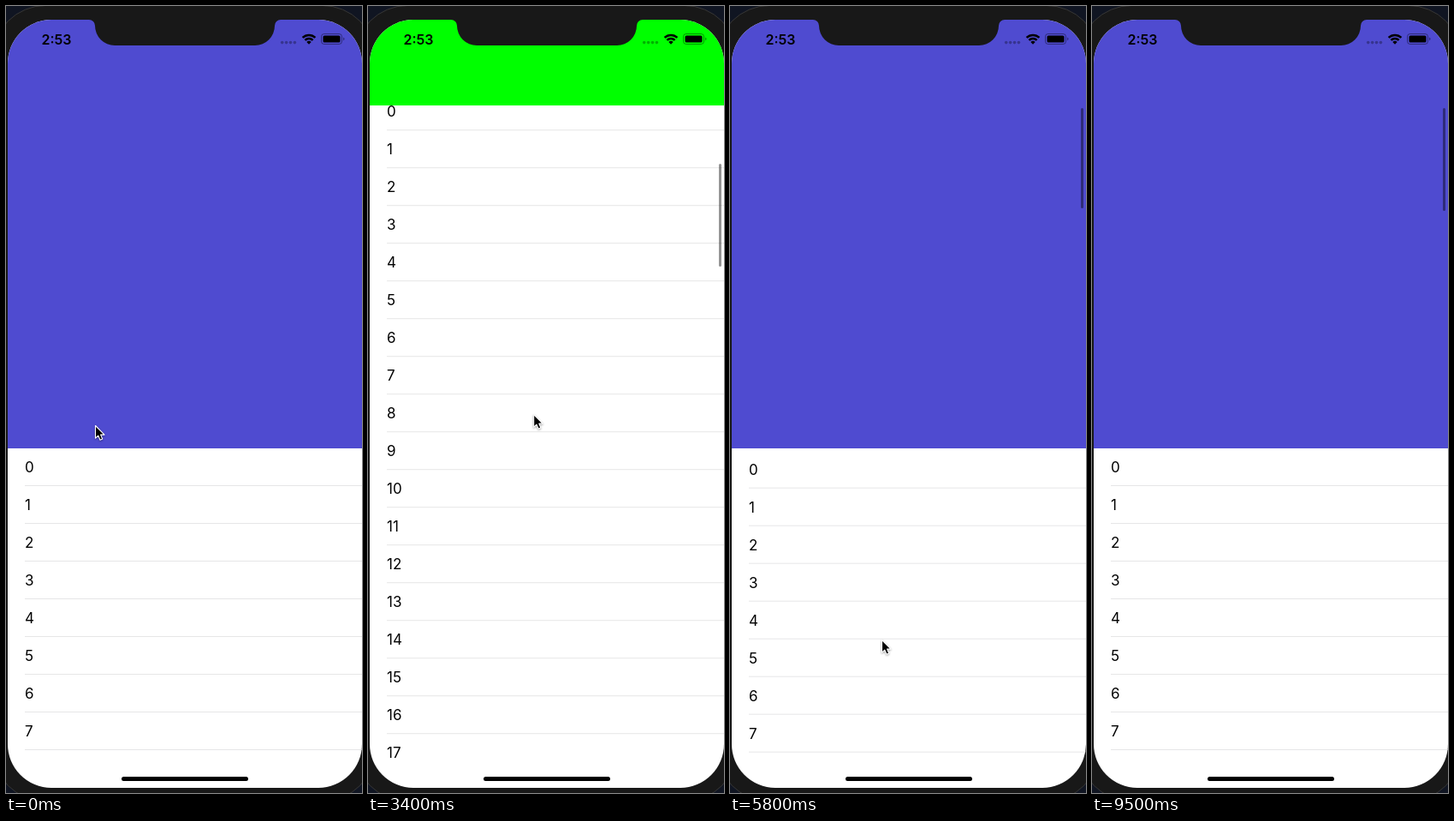
These frames come from a looping animation (416 by 918 pixels, 9.6 s). An HTML page:

```html
<!DOCTYPE html>
<html lang="en">
<head>
<meta charset="utf-8">
<title>Collapsing header</title>
<style>
  html, body { margin: 0; width: 100%; height: 100%; overflow: hidden; background: #101522; }
  body { position: relative; font-family: Inter, sans-serif; color: #000; }
  .body, .screen, .header, .table, .bar, .overlay, .time, .cursor { position: absolute; box-sizing: border-box; }
  .body { left: -16px; top: -1px; width: 448px; height: 929px; border-radius: 62px; background: #181818; border: 1px solid #363636; }
  .screen { left: 2px; top: 16px; width: 414px; height: 896px; border-radius: 51px; overflow: hidden; background: #fff; }
  .table { left: 20px; right: 0; top: 0; height: 862px; overflow: hidden; }
  .list { padding-top: 500px; }
  .row { box-sizing: border-box; height: 44px; font-size: 17px; line-height: 44px; border-bottom: 1px solid #e6e6e7; }
  .header { left: 0; top: 0; width: 100%; }
  .bar { left: 407.5px; top: 103px; width: 3px; border-radius: 1.5px; background: rgba(0, 0, 0, .42); }
  .overlay { left: 0; top: 0; }
  .time { left: 41.5px; top: 28px; font-size: 16px; font-weight: 600; line-height: 22px; }
  .cursor { left: 0; top: -1px; overflow: visible; filter: drop-shadow(0 1px 1px rgba(0, 0, 0, .35)); }
</style>
</head>
<body>
<div class="body"></div>
<div class="screen">
  <div class="table"><div class="list" id="list"></div></div>
  <div class="header" id="header"></div>
  <div class="bar" id="bar"></div>
</div>
<svg class="overlay" width="416" height="918">
  <path fill="#181818" d="M97 15V16A7 7 0 0 1 104 23A23 23 0 0 0 127 46H291A23 23 0 0 0 314 23A7 7 0 0 1 321 16V15Z"/>
  <g opacity=".3">
    <circle cx="322.7" cy="42.6" r="1.8"/><circle cx="327.6" cy="42.6" r="1.8"/>
    <circle cx="332.5" cy="42.6" r="1.8"/><circle cx="337.4" cy="42.6" r="1.8"/>
  </g>
  <g fill="none" stroke="#000" stroke-width="2.5">
    <path d="M346.6 36.9A10.6 10.6 0 0 1 361.4 36.9"/>
    <path d="M349.4 39.9A6.5 6.5 0 0 1 358.6 39.9"/>
  </g>
  <path d="M354 44.8L351.3 42A3.9 3.9 0 0 1 356.7 42Z"/>
  <rect x="368.5" y="32.5" width="24" height="12" rx="3.2" fill="none" stroke="#000" opacity=".4"/>
  <path d="M394 36.6Q395.5 37.2 395.5 38.5T394 40.4Z" opacity=".4"/>
  <rect x="370.5" y="34.5" width="20" height="8" rx="1.6"/>
  <rect x="135" y="899" width="148" height="5" rx="2.5"/>
</svg>
<div class="time">2:53</div>
<svg class="cursor" id="cursor" width="13" height="19">
  <path d="M.5 .5V15.2L3.8 12.1L6 17.2L8.7 16L6.6 11.1H11Z" stroke="#fff" stroke-width="1.1" stroke-linejoin="round"/>
</svg>
<script>
const LOOP = 9600, STEP = 100;
const EXPANDED = 500, COLLAPSED = 100;
const RISE = 450, FALL = 600, BOUNCE = 66, DECAY = 100;

// Each swipe scrolls up to a peak, rests, then falls back and bounces.
const swipes = [
  { up: 500, down: 1600, peak: 520 },
  { up: 2500, down: 3200, peak: 560 },
  { up: 4050, down: 4600, peak: 648 },
  { up: 6400, down: 7330, peak: 500 }
];

// Where the pointer comes to rest: time, x, y
const stops = [
  [0, 104, 490], [500, 204, 800], [1000, 219, 408], [1600, 219, 408],
  [2200, 214, 885], [2500, 205, 800], [2950, 200, 350], [3200, 195, 350],
  [3800, 188, 840], [4500, 181, 665], [5200, 178, 820], [5800, 177, 740],
  [6400, 172, 760], [6850, 163, 304], [7330, 163, 304], [7930, 161, 804]
];

const ease = u => {
  u = Math.min(1, Math.max(0, u));
  return u * u * (3 - 2 * u);
};

function swipeOffset({ up, down, peak }, t) {
  const x = Math.max(0, t - down - FALL) / DECAY;
  return peak * (ease((t - up) / RISE) - ease((t - down) / FALL))
    - BOUNCE * x * Math.exp(1 - x);
}

function pointerAt(t) {
  const next = stops.findIndex(s => s[0] > t);
  if (next < 0) return stops[stops.length - 1].slice(1);
  const [t0, x0, y0] = stops[next - 1], [t1, x1, y1] = stops[next];
  const e = ease((t - t0) / (t1 - t0));
  return [x0 + (x1 - x0) * e, y0 + (y1 - y0) * e];
}

const [list, header, bar, cursor] =
  ['list', 'header', 'bar', 'cursor'].map(id => document.getElementById(id));

for (let i = 0; i < 40; i++) {
  const row = document.createElement('div');
  row.className = 'row';
  row.textContent = i;
  list.append(row);
}

function render(t) {
  const offset = swipes.reduce((sum, s) => sum + swipeOffset(s, t), 0);
  const height = Math.min(EXPANDED, Math.max(COLLAPSED, EXPANDED - offset));
  list.style.transform = `translateY(${-offset}px)`;
  header.style.height = height + 'px';
  header.style.background = height > COLLAPSED ? '#4f4bd0' : '#00ff00';

  bar.style.visibility = t < swipes[0].up ? 'hidden' : 'visible';
  bar.style.height = 120 + Math.min(0, offset) + 'px';
  bar.style.transform = `translateY(${Math.max(0, offset) * .157}px)`;

  const [x, y] = pointerAt(t);
  const away = (t > 2200 && t < 2500) || t > 8300;
  cursor.style.visibility = away ? 'hidden' : 'visible';
  cursor.style.transform = `translate(${x}px, ${y}px)`;
}

const start = performance.now();
function tick() {
  const t = (performance.now() - start) % LOOP;
  render(Math.floor(t / STEP) * STEP);
  requestAnimationFrame(tick);
}
tick();
</script>
</body>
</html>
```
